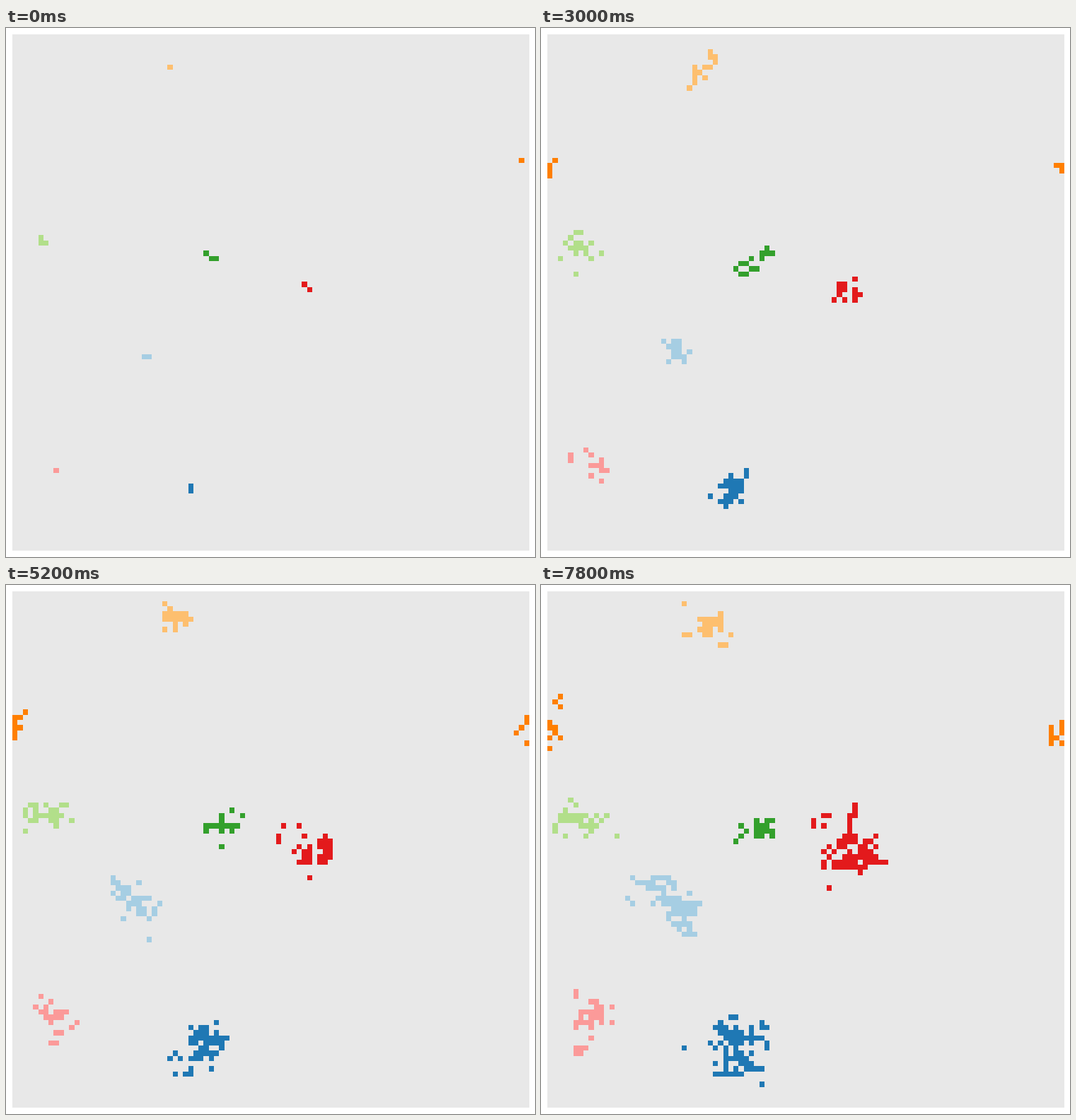
A matplotlib script for the animation above (8000 ms loop, 748 by 749 pixels).

```python
import random

import matplotlib.pyplot as plt
import numpy as np
from matplotlib.animation import FuncAnimation
from matplotlib.colors import to_rgb

W, H, DPI = 748, 749, 128
FRAMES, INTERVAL = 40, 200
GRID = 100
EMPTY = "#e8e8e8"

# colour, founding cells, final centre, final size, exponent of growth
COLONIES = [
    ("#a6cee3", [(25, 62), (26, 62)], (23, 59.5), 56, 1.6),
    ("#1f78b4", [(34, 87), (34, 88)], (36, 88), 64, 1.1),
    ("#b2df8a", [(5, 39), (5, 40), (6, 40)], (6, 44), 28, 0.6),
    ("#33a02c", [(37, 42), (38, 43), (39, 43)], (41, 45.5), 17, 0.4),
    ("#fb9a99", [(8, 84)], (8, 82), 30, 1.0),
    ("#e31a1c", [(56, 48), (57, 49)], (57.5, 49.8), 63, 1.9),
    ("#fdbf6f", [(30, 6)], (30, 6), 22, 0.6),
    ("#ff7f00", [(98, 24)], (100, 26), 19, 1.1),
]

NEAR = [(dx, dy) for dx in (-1, 0, 1) for dy in (-1, 0, 1) if dx or dy]


def around(cell):
    return [(cell[0] + dx, cell[1] + dy) for dx, dy in NEAR]


def pick_spot(cell, taken, pull, rng):
    """Choose a free neighbour, leaning along pull and towards company."""
    spots = [s for s in around(cell) if s not in taken]
    if not spots:
        return None
    company = [sum(s in taken for s in around(spot)) for spot in spots]
    lean = (np.array(spots) - cell) @ pull
    weights = np.exp(lean + 0.35 * np.array(company))
    return rng.choices(spots, weights)[0]


def wander(cells, goal, size, rng):
    """Move cells at random while holding the colony's place and spread."""
    taken = set(cells)
    pts = np.array(cells, float)
    mean = pts.mean(axis=0)
    spread = np.sqrt(pts.var(axis=0).mean())
    excess = np.clip(1 - spread / (0.42 * np.sqrt(size)), -1, 0.4)
    for cell in cells:
        pull = 0.7 * (goal - mean) + 0.8 * excess * (np.array(cell) - mean)
        if rng.random() < 0.6:
            taken.remove(cell)
            spot = pick_spot(cell, taken, np.clip(pull, -2, 2), rng)
            taken.add(spot or cell)
    return sorted(taken)


def renew(cells, size, rng):
    """Let some cells die, then refill the colony beside living ones."""
    rng.shuffle(cells)
    cells = cells[:min(size, max(1, round(0.88 * len(cells))))]
    while len(cells) < size:
        spot = pick_spot(rng.choice(cells), cells, np.zeros(2), rng)
        if spot:
            cells.append(spot)
    return cells


def grow(founders, end, final, pace, rng):
    start = np.mean(founders, axis=0)
    cells, history = list(founders), [list(founders)]
    for step in range(1, FRAMES):
        t = step / (FRAMES - 1)
        goal = start + (np.array(end) - start) * (1 - (1 - t) ** 2)
        size = round(len(founders) + (final - len(founders)) * t ** pace)
        cells = renew(wander(cells, goal, size, rng), size, rng)
        history.append(list(cells))
    return history


HISTORIES = [(to_rgb(color), grow(*life, random.Random(20 + i)))
             for i, (color, *life) in enumerate(COLONIES)]


def world(step):
    grid = np.full((GRID, GRID, 3), to_rgb(EMPTY))
    for color, history in HISTORIES:
        for x, y in history[step]:
            grid[y % GRID, x % GRID] = color
    return grid


fig = plt.figure(figsize=(W / DPI, H / DPI), dpi=DPI, facecolor="white")
ax = fig.add_axes([9 / W, 9 / H, 731 / W, 731 / H])
ax.axis("off")
image = ax.imshow(world(0), interpolation="nearest", aspect="auto")


def update(step):
    image.set_data(world(step))
    return [image]


anim = FuncAnimation(fig, update, frames=FRAMES, interval=INTERVAL,
                     init_func=lambda: update(0), repeat=True,
                     repeat_delay=0, blit=False)
plt.show()
```
